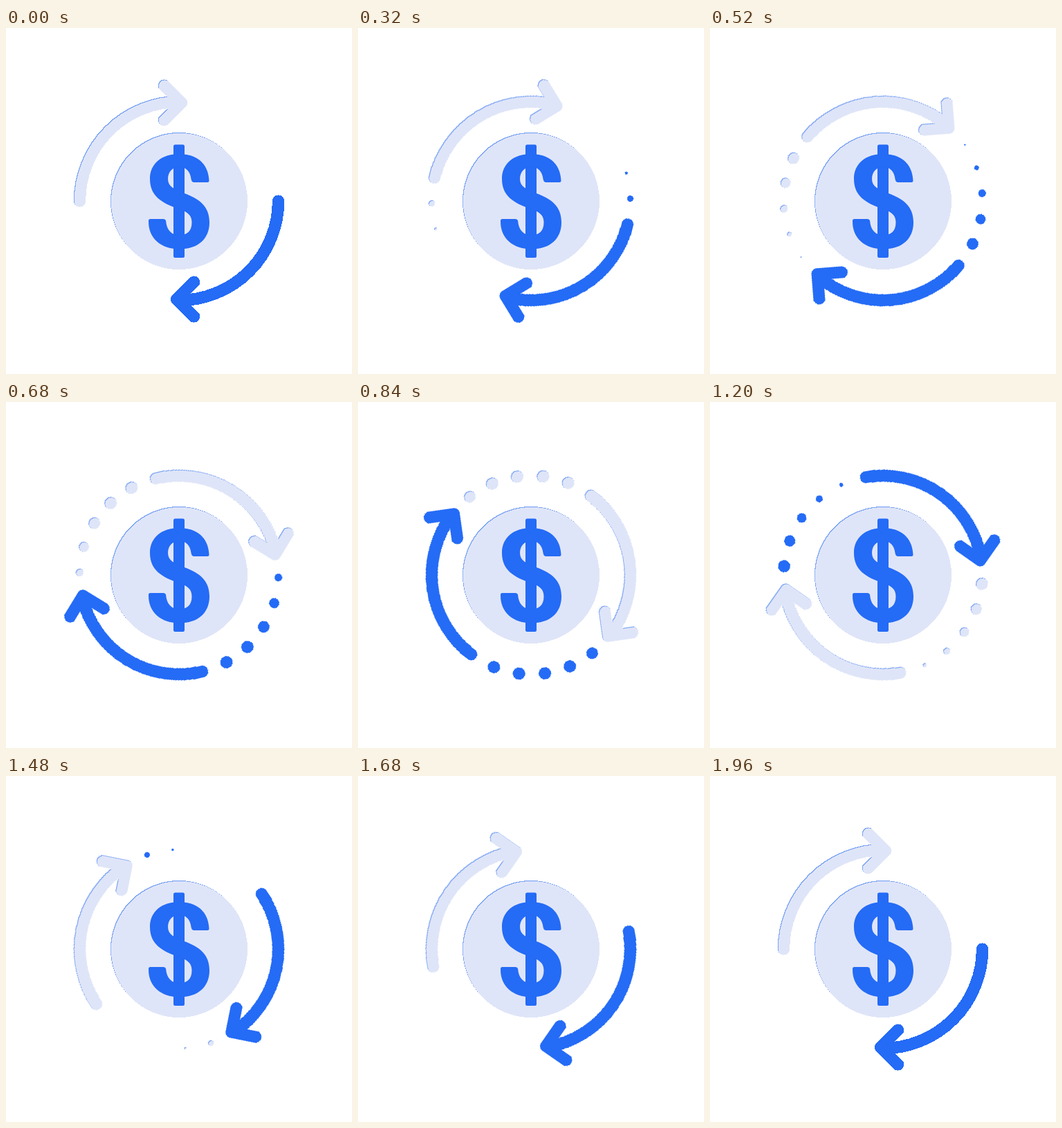
Write an HTML page without scripts that moves like this. It is 500 by 500 pixels and loops after 3 s.

```html
<!DOCTYPE html>
<html lang="en">
<head>
<meta charset="utf-8">
<title>Money cycle</title>
<style>
  :root { --blue: #246bf6; --pale: #dfe5f8; }
  html, body { margin: 0; width: 100%; height: 100%; overflow: hidden; background: #fff; }
  svg { display: block; width: 100%; height: 100%; }

  .blue { fill: var(--blue); stroke: var(--blue); }
  .pale { fill: var(--pale); stroke: var(--pale); }
  .shaft { fill: none; stroke-width: 17.4; stroke-linecap: round; stroke-linejoin: round; }
  .crisp { shape-rendering: crispEdges; }

  .spin { animation: spin 3s infinite; }
  @keyframes spin {
    0% { transform: rotate(0deg); animation-timing-function: cubic-bezier(.53, 0, .47, 1); }
    65.4%, 100% { transform: rotate(360deg); }
  }

  /* Trailing dots swell and shrink one after another */
  .dot {
    stroke: none;
    transform-box: fill-box;
    transform-origin: center;
    animation: pulse 3s calc(var(--i) * 80ms) infinite both;
  }
  @keyframes pulse {
    0%, 5.5% { transform: scale(0); animation-timing-function: cubic-bezier(.39, .575, .565, 1); }
    21.5% { transform: scale(1); animation-timing-function: linear; }
    27.5% { transform: scale(1); animation-timing-function: cubic-bezier(.47, 0, .745, .715); }
    43.5%, 100% { transform: scale(0); }
  }
</style>
</head>
<body>
<svg viewBox="-250 -250 500 500">
  <defs>
    <!-- Blue inner edge along the upper left, fixed to the stage -->
    <filter id="bevel" filterUnits="userSpaceOnUse" x="-250" y="-250" width="500" height="500"
            color-interpolation-filters="sRGB">
      <feOffset in="SourceAlpha" dx=".8" dy="1.2"/>
      <feGaussianBlur stdDeviation=".6" result="inner"/>
      <feFlood flood-color="#7ba4f5"/>
      <feComposite in2="inner" operator="out"/>
      <feComposite in2="SourceAlpha" operator="in" result="edge"/>
      <feMerge>
        <feMergeNode in="SourceGraphic"/>
        <feMergeNode in="edge"/>
      </feMerge>
    </filter>
    <path id="arrow" class="shaft"
          d="M-143.5 0A143.5 143.5 0 0 1 0 -143.5M-21.5 -166.9L3.4 -142.1L-21.5 -117.1"/>
  </defs>

  <circle class="pale crisp" r="99" stroke-width="0" filter="url(#bevel)"/>

  <g class="blue" stroke-width="0" transform="translate(-250 -250)">
    <rect x="242" y="168.5" width="16" height="163.5" rx="2.5"/>
    <path d="M293.5 220.5Q293.5 223 291 223H272Q268 223 267.5 218
             C266.5 208 260 200.5 250.5 200.5C241 200.5 234 208 234 218
             C234 229 243 233.5 258 239C280 247 294 258 294 281
             C294 305 277 319.5 251 319.5C224 319.5 206 304 206 280V278.5
             Q206 276 208.5 276H227Q231 276 231.2 279.5
             C232 291 239 299.5 250 299.5C262 299.5 268.5 293 268.5 281
             C268.5 271 263 266 250 261.5C225 253 208 243 208 218
             C208 196 225 182 250 182C276 182 292.5 196 293.5 220.5Z"/>
  </g>

  <g filter="url(#bevel)">
    <g class="spin pale crisp">
      <use href="#arrow"/>
      <g transform="rotate(-15)"><circle class="dot" style="--i:0" cx="-143.5" r="9"/></g>
      <g transform="rotate(-30)"><circle class="dot" style="--i:1" cx="-143.5" r="9"/></g>
      <g transform="rotate(-45)"><circle class="dot" style="--i:2" cx="-143.5" r="9"/></g>
      <g transform="rotate(-60)"><circle class="dot" style="--i:3" cx="-143.5" r="9"/></g>
      <g transform="rotate(-75)"><circle class="dot" style="--i:4" cx="-143.5" r="9"/></g>
    </g>
  </g>

  <g transform="rotate(180)">
    <g class="spin blue crisp">
      <use href="#arrow"/>
      <g transform="rotate(-15)"><circle class="dot" style="--i:0" cx="-143.5" r="9"/></g>
      <g transform="rotate(-30)"><circle class="dot" style="--i:1" cx="-143.5" r="9"/></g>
      <g transform="rotate(-45)"><circle class="dot" style="--i:2" cx="-143.5" r="9"/></g>
      <g transform="rotate(-60)"><circle class="dot" style="--i:3" cx="-143.5" r="9"/></g>
      <g transform="rotate(-75)"><circle class="dot" style="--i:4" cx="-143.5" r="9"/></g>
    </g>
  </g>
</svg>
</body>
</html>
```
